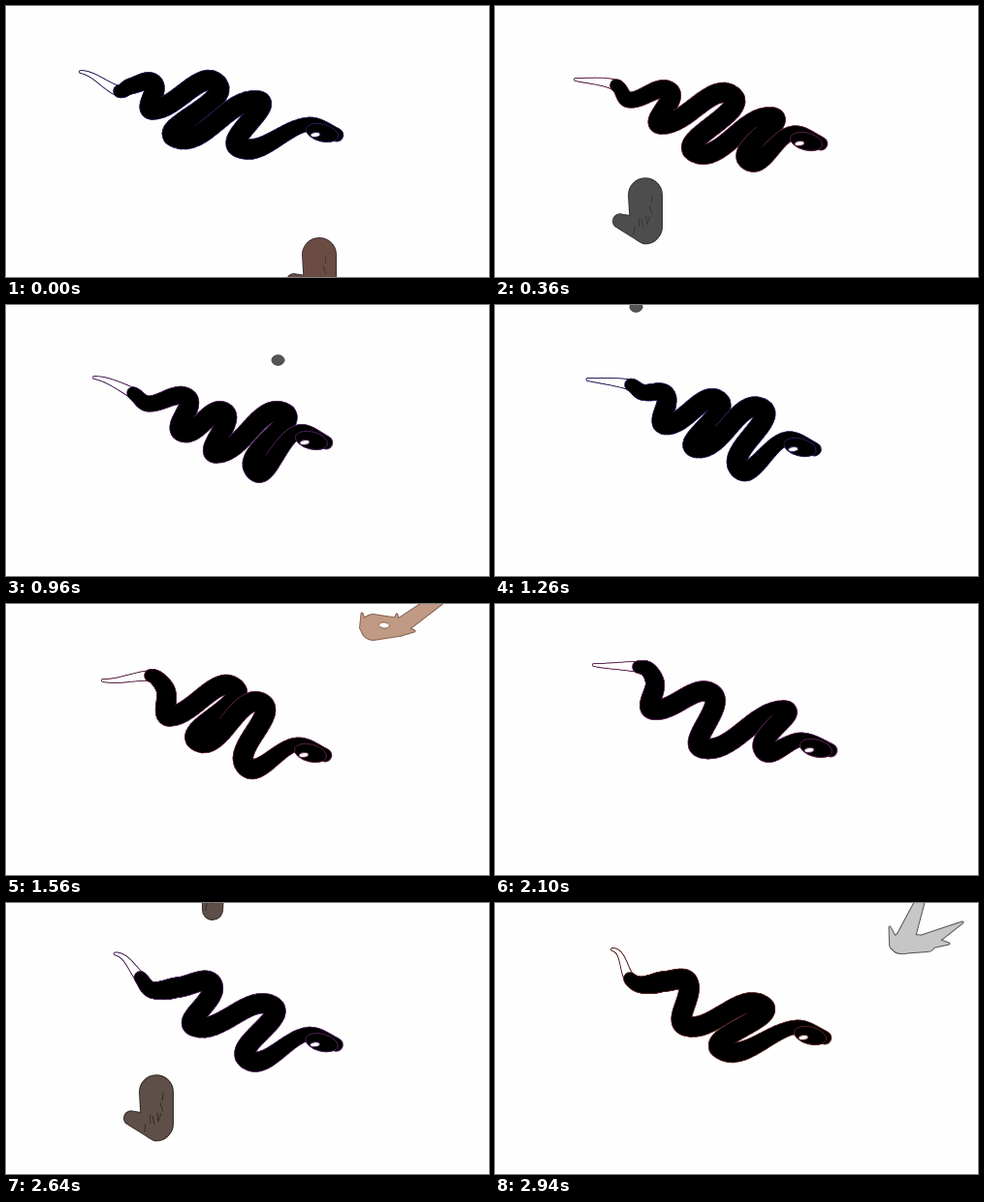
These frames come from a looping animation (498 px wide and 280 px high, 3000 ms). An HTML page with a canvas:

```html
<!DOCTYPE html>
<html lang="en">
<head>
<meta charset="utf-8">
<title>Slithering snake</title>
<style>
html, body { margin: 0; width: 100%; height: 100%; overflow: hidden; background: #fefefe; }
canvas { display: block; }
</style>
</head>
<body>
<canvas id="stage" width="498" height="280"></canvas>
<script>
const ctx = document.getElementById('stage').getContext('2d');
const STEP = 60, COUNT = 50, SUB = 16;
const poses = [];

// Key points: tail tip, rattle end, shoulder, three top/bottom bend pairs, nose.
function pose(at, ...pts) { poses.push({ at, pts }); }
pose(0, 77,68, 117,88, 128,83, 152,80, 151,107, 218,81, 175,136, 260,98, 240,146, 343,134);
pose(6, 83,76, 125,82, 138,97, 180,88, 171,122, 245,93, 206,151, 286,115, 261,159, 338,143);
pose(16, 91,75, 131,91, 146,102, 187,96, 182,131, 225,111, 217,153, 286,111, 256,170, 332,143);
pose(26, 100,79, 149,74, 157,78, 165,90, 169,116, 236,87, 198,142, 263,102, 247,167, 331,157);
pose(35, 102,63, 148,65, 158,68, 165,82, 163,109, 224,93, 214,149, 298,110, 277,150, 348,152);
pose(40, 106,56, 138,76, 149,93, 163,95, 180,92, 224,87, 193,128, 274,107, 261,169, 343,153);
pose(49, 121,48, 139,78, 148,84, 160,84, 175,81, 199,82, 197,127, 276,106, 233,151, 342,140);

const mix = (a, b, k) => a + (b - a) * k;

function spineAt(frame) {
  let i = 0;
  while (i < poses.length - 2 && frame >= poses[i + 1].at) i++;
  const a = poses[i], b = poses[i + 1], k = (frame - a.at) / (b.at - a.at);
  const flat = a.pts.map((v, j) => mix(v, b.pts[j], k)), spine = [];
  for (let j = 0; j < flat.length; j += 2) spine.push([flat[j], flat[j + 1]]);
  const nose = spine.pop();
  return [...spine, [nose[0] - 31, nose[1] - 12], nose];
}

function girth(u) {
  if (u < 1) return 3 + 8 * u;
  return Math.min(20, 9 + 3.2 * u, 13 + Math.max(0, 9 - u) * 8);
}

function heading(from, to) {
  const x = to[0] - from[0], y = to[1] - from[1], len = Math.hypot(x, y) || 1;
  return [x / len, y / len, len];
}

// Hermite curve whose pull at each point equals the length of the leg.
function curve(spine) {
  const last = spine.length - 1, out = [];
  const dirs = spine.map((p, i) =>
    i ? heading(spine[i - 1], spine[Math.min(last, i + 1)]) : [1, 0.1]);
  for (let i = 0; i < last; i++) {
    const len = heading(spine[i], spine[i + 1])[2];
    for (let j = 0; j < SUB; j++) {
      const t = j / SUB, s = 1 - t;
      const at = d => spine[i][d] * s * s * (1 + 2 * t) + spine[i + 1][d] * t * t * (3 - 2 * t)
        + len * t * s * (s * dirs[i][d] - t * dirs[i + 1][d]);
      out.push({ x: at(0), y: at(1), w: girth(i + t) });
    }
  }
  return out;
}

function tube(pts, from, to, color, extra) {
  ctx.strokeStyle = color;
  for (let i = from; i < Math.min(to, pts.length - 1); i++) {
    ctx.lineWidth = pts[i].w + extra;
    ctx.beginPath();
    ctx.moveTo(pts[i].x, pts[i].y);
    ctx.lineTo(pts[i + 1].x, pts[i + 1].y);
    ctx.stroke();
  }
}

function oval(x, y, rx, ry, angle, fill, line) {
  ctx.beginPath();
  ctx.ellipse(x, y, rx, ry, angle, 0, Math.PI * 2);
  ctx.fillStyle = fill;
  ctx.fill();
  ctx.strokeStyle = line;
  ctx.lineWidth = 1;
  ctx.stroke();
}

function rattle(pts, edge) {
  tube(pts, 0, SUB, edge, 1);
  tube(pts, 0, SUB, '#fff', -1);
  ctx.strokeStyle = edge;
  ctx.lineWidth = 1;
  for (let i = 3; i < SUB; i += 3) {
    const p = pts[i], [dx, dy] = heading(pts[i - 1], pts[i + 1]), r = p.w / 2;
    ctx.beginPath();
    ctx.moveTo(p.x - dy * r, p.y + dx * r);
    ctx.quadraticCurveTo(p.x + dx * 3, p.y + dy * 3, p.x + dy * r, p.y - dx * r);
    ctx.stroke();
  }
}

function snake(frame) {
  const spine = spineAt(frame), pts = curve(spine);
  const hue = 305 - 60 * Math.cos(frame * Math.PI / 10);
  const edge = `hsl(${hue}, 45%, 24%)`;
  rattle(pts, edge);
  for (let i = SUB; i < pts.length; i += 8) {
    tube(pts, i, i + 8, edge, 1.4);
    tube(pts, Math.max(SUB, i - 8), i + 8, '#000', -0.6);
  }
  const [x, y] = spine[spine.length - 1];
  oval(x - 17, y - 3, 17, 9, 0.25, '#000', edge);
  oval(x - 24, y - 1, 5, 2.4, -0.1, '#fff', edge);
}

// Capsule from one round end to the other.
function limb(ax, ay, bx, by, ra, rb) {
  const a = Math.atan2(by - ay, bx - ax), q = Math.PI / 2, path = new Path2D();
  path.arc(ax, ay, ra, a + q, a + 3 * q);
  path.arc(bx, by, rb, a - q, a + q);
  path.closePath();
  return path;
}

function solid(limbs, fill, line) {
  ctx.strokeStyle = line;
  ctx.lineWidth = 2;
  limbs.forEach(p => ctx.stroke(p));
  ctx.fillStyle = fill;
  limbs.forEach(p => ctx.fill(p));
}

function grain(x, y, w, h, line) {
  let seed = 7;
  const rnd = () => (seed = seed * 16807 % 2147483647) / 2147483647;
  ctx.strokeStyle = line;
  ctx.lineWidth = 1;
  for (let i = 0; i < 7; i++) {
    const gx = x + rnd() * w, gy = y + rnd() * h;
    ctx.beginPath();
    ctx.moveTo(gx, gy);
    ctx.lineTo(gx + rnd() * 6 - 3, gy + 8);
    ctx.stroke();
  }
}

function placed(x, y, draw) {
  ctx.save();
  ctx.translate(x, y);
  draw();
  ctx.restore();
}

function stump(p, fill, line) {
  placed(290 - 31 * p + 0.5 * p * p, 240 - 11.3 * p + 0.17 * p * p, () => {
    solid([limb(33, 17, 34, 50, 17, 16), limb(7, 44, 34, 54, 7, 13)], fill, line);
    grain(22, 6, 22, 48, line);
  });
}

function fork(fill, line) {
  solid([limb(321, 51, 322, 20, 10, 11), limb(322, 24, 319, 6, 11, 9),
    limb(326, 32, 352, -12, 11, 11)], fill, line);
  grain(315, 5, 14, 42, line);
}

function leaf() {
  const line = '#85604f';
  solid([limb(379, 24, 405, 24, 13, 9), limb(369, 24, 367, 10, 4, 0.5),
    limb(402, 22, 403, 11, 4, 0.5), limb(406, 27, 421, 28, 6, 0.5),
    limb(404, 25, 470, -22, 8, 5)], '#c09a84', line);
  oval(390, 22, 5.5, 3, 0.1, '#fff', line);
}

function spikes() {
  solid([limb(418, 42, 446, 42, 10, 8), limb(412, 43, 407, 25, 5, 0.5),
    limb(421, 42, 443, -14, 10, 3), limb(445, 40, 482, 20, 8, 0.5),
    limb(452, 41, 468, 42, 5, 0.5)], '#c6c6c6', '#555');
}

const between = (f, a, b) => f >= a && f <= b;
// Scenery glides up and to the left as the snake advances.
const glide = (f, at, draw) => placed((at - f) * 27, (at - f) * 11, draw);

function scenery(f) {
  const k = Math.min(1, f / 6), bark = '#5e5048', dark = '#332a25';
  if (between(f, 0, 8)) stump(f, `rgb(${mix(107, 77, k)}, ${mix(76, 77, k)}, ${mix(67, 77, k)})`, '#3a3533');
  if (between(f, 10, 21)) glide(f, 16, () => oval(280.5, 57, 6.5, 5.3, 0, '#555', '#444'));
  if (between(f, 22, 30)) glide(f, 26, leaf);
  if (between(f, 37, 46)) stump(f - 38, bark, dark);
  if (between(f, 39, 45)) glide(f, 40, () => fork(bark, dark));
  if (between(f, 46, 49)) glide(f, 49, spikes);
}

ctx.lineCap = ctx.lineJoin = 'round';
function draw() {
  const frame = Math.floor(performance.now() / STEP) % COUNT;
  ctx.fillStyle = '#fefefe';
  ctx.fillRect(0, 0, 498, 280);
  scenery(frame);
  snake(frame);
  requestAnimationFrame(draw);
}
draw();
</script>
</body>
</html>
```
